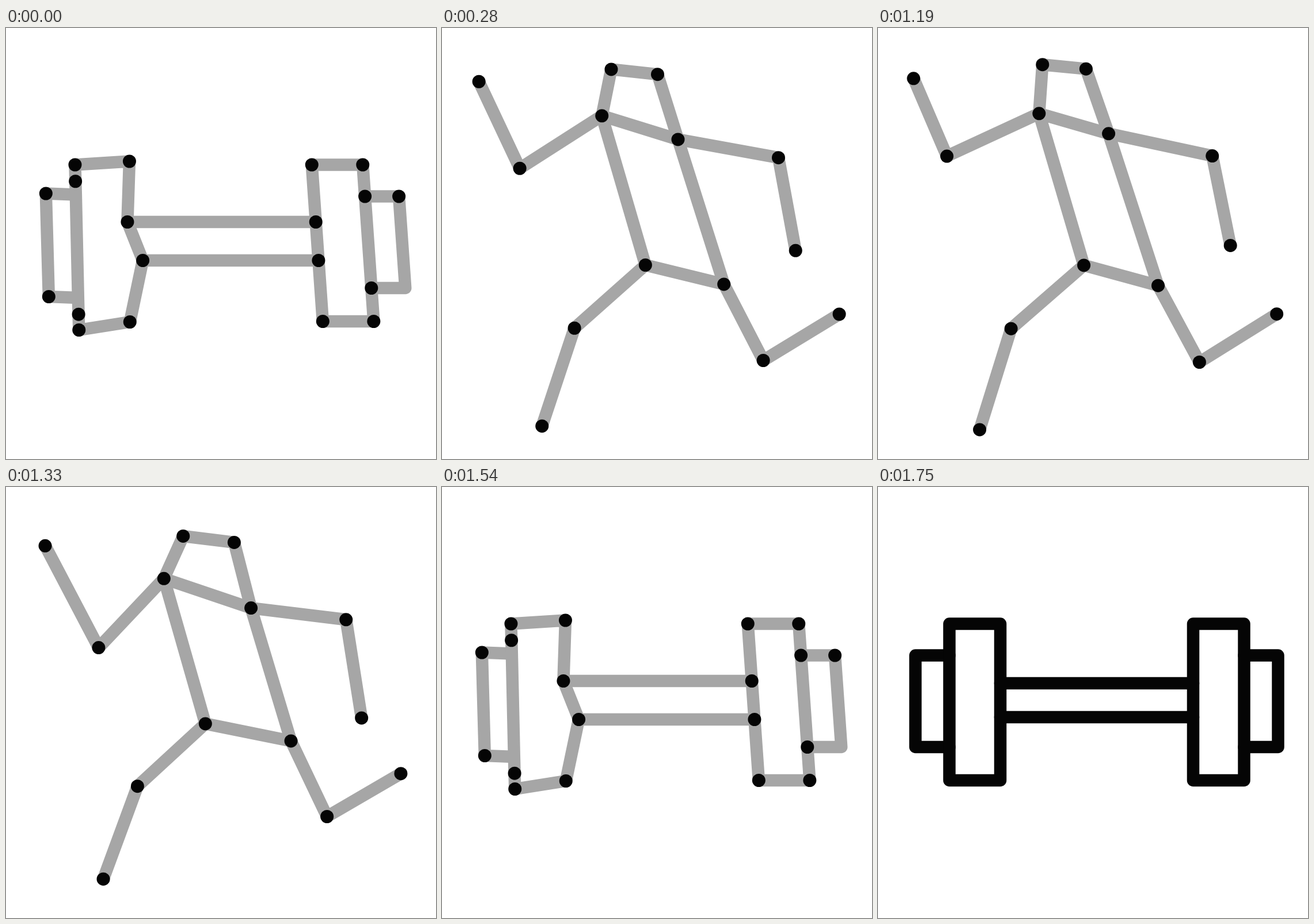
An HTML page with a canvas that plays this animation: 747x750 px, repeating every 2590 ms.

```html
<!DOCTYPE html>
<html>
<head>
<meta charset="utf-8">
<title>Dumbbell and runner</title>
<style>
html, body { margin: 0; width: 100%; height: 100%; overflow: hidden; background: #fff; }
canvas { display: block; }
</style>
</head>
<body>
<canvas id="stage" width="747" height="750"></canvas>
<script>
const ctx = document.getElementById('stage').getContext('2d');
const GREY = '#a6a6a6', BLACK = '#050505';
const STEP = 70, STEPS = 37, WIDTH = 760;

const points = (...n) => n.flatMap((x, i) => i % 2 ? [] : [[x, n[i + 1]]]);
const between = ([x, y], [u, v], k) => [x + (u - x) * k, y + (v - y) * k];
const easeOut = u => 1 - (1 - u) ** 2;

function stroke(path, color) {
  ctx.strokeStyle = color;
  ctx.beginPath();
  path.forEach(p => ctx.lineTo(...p));
  ctx.stroke();
}

function dot([x, y]) {
  ctx.beginPath();
  ctx.arc(x, y, 11.5, 0, 7);
  ctx.fill();
}

// Runner: hand, elbow, shoulder, head, head, shoulder, elbow, hand; then foot, knee, hip, hip, knee, foot
const STRIDE = points(73.5, 115, 197, 329, 269.5, 168.5, 327, 104.5, 427, 118.5, 447.5, 234, 599.5, 238, 622.5, 422.5,
  162.5, 667.5, 226, 518.5, 336.5, 411, 502.5, 436.5, 557, 566.5, 680, 499.5);
const LEAP = points(61, 86, 114.5, 216, 280.5, 147.5, 283, 61, 357, 68, 397.5, 180.5, 579.5, 221.5, 611.5, 375.5,
  177.5, 701, 231.5, 523.5, 359, 413, 485.5, 449, 558.5, 582.5, 693.5, 497.5);
const CHAINS = [[0, 1, 2, 3, 4, 5, 6, 7], [8, 9, 10, 2, 5, 11, 12, 13], [10, 11]];

function drawRunner(k) {
  const pose = STRIDE.map((p, i) => between(p, LEAP[i], k));
  CHAINS.forEach(chain => stroke(chain.map(i => pose[i]), GREY));
  pose.forEach(dot);
}

// Dumbbell: each quarter has a tip, joint, outer corner, inner corner and bar end
const TIP = 65, OUTER = 124, INNER = 212.5;
const LEFT_NUDGE = [points(7, -5, 0, -3, 0, 0, 6, -6, 0, 0), points(8, 15, 0, 17, 0, 15, 0, 1, 25, 0)];

function quarter(right, bottom, loose) {
  const [plate, end, bar] = bottom ? [510.5, 452.5, 400.5 + 4 * loose] : [238, 293, 341.5 - 4 * loose];
  const corners = points(TIP, end, OUTER, end, OUTER, plate, INNER, plate, INNER, bar);
  return corners.map(([x, y], i) => {
    if (right) return [WIDTH - x + (y - 470) * .07 * loose, y];
    const [dx, dy] = LEFT_NUDGE[bottom][i];
    return [x + ((y - 400) * .025 + dx) * loose, y + dy * loose];
  });
}

function drawBell(loose) {
  const color = loose ? GREY : BLACK;
  const sides = [0, 1].map(right => [0, 1].map(bottom => quarter(right, bottom, loose)));
  const [left, right] = sides;
  for (const [top, bottom] of sides) {
    stroke([top[1], top[0], bottom[0], bottom[1]], color);
    stroke([...top.slice(1), ...bottom.slice(1).reverse(), top[1]], color);
  }
  [0, 1].forEach(i => stroke([left[i][4], right[i][4]], color));
  if (!loose) return;
  // The left joints' dots sit near the ends of the plate
  const inset = [.1, .905].map(k => between(left[0][2], left[1][2], k));
  left.forEach((q, i) => [q[0], inset[i], ...q.slice(2)].forEach(dot));
  right.forEach((q, i) => q.slice(i).forEach(dot));
}

function draw(now) {
  const step = Math.floor(now / STEP) % STEPS;
  const level = Math.min(step, 6, 22 - step);
  ctx.fillStyle = '#fff';
  ctx.fillRect(0, 0, 747, 750);
  ctx.fillStyle = BLACK;
  ctx.lineWidth = 21.5;
  ctx.lineCap = ctx.lineJoin = 'round';
  if (level > 0) drawRunner(easeOut((level - 2) / 4));
  else drawBell(Math.max(0, 1 + Math.min(0, level) / 3) ** 3);
}

const start = performance.now();
function tick() {
  draw(performance.now() - start);
  requestAnimationFrame(tick);
}
tick();
</script>
</body>
</html>
```
